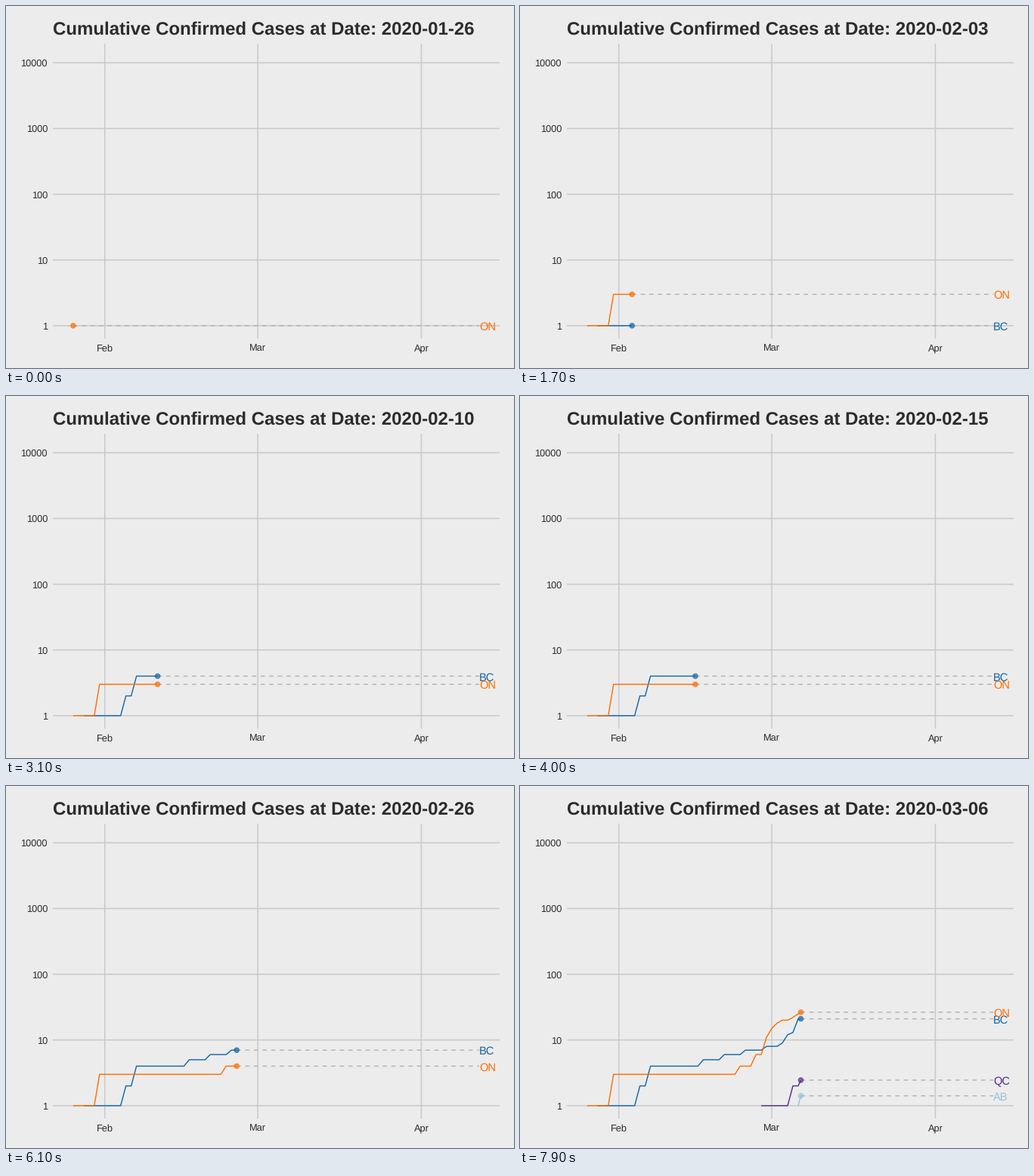
A matplotlib script that plays this animation: 672x480 px, repeating every 8000 ms.

```python
import numpy as np
import matplotlib.pyplot as plt
from matplotlib.animation import FuncAnimation
from matplotlib.patches import Circle

W, H, DPI = 672, 480, 96
FRAMES, INTERVAL = 80, 100
PX = 72 / DPI                       # one pixel in points
X0, DAY = 88.86, 6.978              # first day and width of a day
Y1, DECADE = 423.9, 87.15           # height of one case, size of a decade
LAST_DAY = 77
RATE = 149 / 76                     # animation steps per day

BG, GRID, INK, DASH = "#ececec", "#c9c9c9", "#2c2c2c", "#b2b2b2"

plt.rcParams.update({
    "font.family": "Liberation Sans",
    "text.hinting": "none",
    "path.snap": False,
})

# name: (colour, first day, daily cumulative counts)
SERIES = {
    "AB": ("#97c4dd", 40, [1, 2]),
    "BC": ("#1366a7", 2, [1] * 8 + [2] * 2 + [4] * 10 + [5] * 4 + [6] * 4
           + [7] * 4 + [8] * 3 + [9, 12, 13, 21, 21]),
    "ON": ("#ff6d00", 0, [1] * 5 + [3] * 24 + [4] * 3 + [6] * 2
           + [11, 15, 18, 20, 20, 22, 25, 28]),
    "QC": ("#572c8a", 33, [1] * 6 + [2, 2, 3]),
}

# each day is reached on a whole step, with even motion in between
DAYS = np.arange(LAST_DAY)
STEPS = np.round(DAYS * RATE)


def x_at(day):
    return X0 + DAY * day


def y_at(count):
    return Y1 - DECADE * np.log10(count)


fig = plt.figure(figsize=(W / DPI, H / DPI), dpi=DPI, facecolor=BG)
ax = fig.add_axes([0, 0, 1, 1])
ax.set(xlim=(0, W), ylim=(H, 0))
ax.axis("off")


def label(x, y, text, size, color=INK, **kw):
    return ax.text(x, y, text, fontsize=size * PX, color=color,
                   va="baseline", **kw)


def line(xs, ys, color, width, **kw):
    return ax.plot(xs, ys, color=color, lw=width * PX, **kw)[0]


for power in range(5):
    y = Y1 - DECADE * power
    line([62, 653], [y, y], GRID, 1.55, solid_capstyle="butt", zorder=1)
    label(55, y + 4.9, str(10 ** power), 12.8, ha="right")

for day, month in ((6, "Feb"), (35, "Mar"), (66, "Apr")):
    x = x_at(day)
    line([x, x], [50, 441], GRID, 1.55, solid_capstyle="butt", zorder=1)
    label(x, 458, month, 12.8, ha="center")

title = label(62, 37.4, "", 24, weight="bold")


class Province:
    def __init__(self, name, color, start, counts):
        self.start = start
        self.days = start + np.arange(len(counts))
        self.xs = x_at(self.days)
        self.ys = y_at(np.array(counts))
        self.path = line([], [], color, 1.42, solid_capstyle="butt",
                         solid_joinstyle="round", zorder=2)
        self.lead = line([], [], DASH, 1.42, ls=(0, (4, 4)),
                         dash_capstyle="butt", zorder=3)
        self.dot = ax.add_patch(Circle((0, 0), 3.3, color=color, alpha=0.7,
                                       lw=0.945 * PX, zorder=4))
        self.name = label(x_at(LAST_DAY), 0, name, 14.67, color, zorder=5)
        self.parts = (self.path, self.lead, self.dot, self.name)

    def show(self, day):
        visible = day >= self.start
        for part in self.parts:
            part.set_visible(visible)
        if not visible:
            return
        x, y = x_at(day), np.interp(day, self.days, self.ys)
        past = self.days < day
        self.path.set_data(np.append(self.xs[past], x),
                           np.append(self.ys[past], y))
        self.lead.set_data([x, x_at(LAST_DAY)], [y, y])
        self.dot.center = x, y
        self.name.set_y(y + 6)


provinces = [Province(name, *spec) for name, spec in SERIES.items()]


def draw(step):
    date = np.datetime64("2020-01-26") + int(step / RATE)
    title.set_text(f"Cumulative Confirmed Cases at Date: {date}")
    day = np.interp(step, STEPS, DAYS)
    for province in provinces:
        province.show(day)
    return []


anim = FuncAnimation(fig, draw, frames=FRAMES, interval=INTERVAL,
                     repeat=True, repeat_delay=0, blit=False)
plt.show()
```
